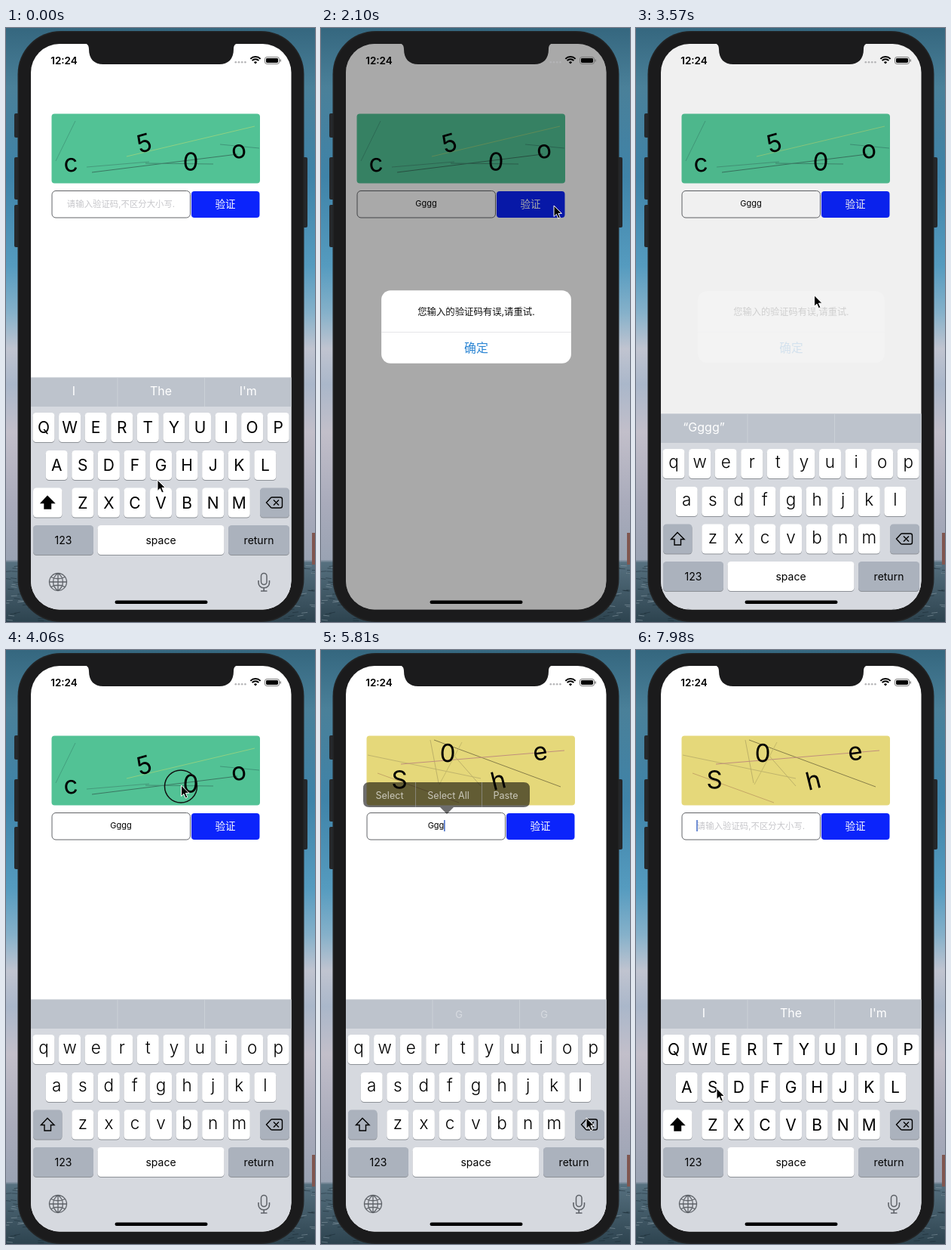
Animation, 410 px wide and 786 px high, one loop 8000 ms. Source, as an HTML page with a canvas:

```html
<!DOCTYPE html>
<html lang="zh">
<head>
<meta charset="utf-8">
<title>Captcha check</title>
<style>
html, body { margin: 0; width: 100%; height: 100%; overflow: hidden; }
canvas { display: block; width: 410px; height: 786px; }
</style>
</head>
<body>
<canvas id="stage" width="410" height="786"></canvas>
<script>
const ctx = document.getElementById('stage').getContext('2d');
const FONT = 'Inter, "Noto Sans CJK SC", "Noto Sans CJK", sans-serif';
const LOOP = 8000, STEP = 70;

const TYPED = [100, 260, 420, 580];
const DELETED = [5660, 6000, 6240, 6480];
const CLICKS = [...TYPED, 1600, 3150, 4000, 4850, ...DELETED];
const POINTER = [
  [0, 201, 598], [640, 201, 598], [910, 259, 442], [1330, 309, 235],
  [2240, 309, 235], [2900, 238, 415], [3430, 238, 415], [3850, 232.5, 179],
  [4200, 232.5, 179], [4700, 166, 232], [5000, 166, 232], [5450, 352, 619],
  [6750, 352, 619], [7600, 107, 580], [8000, 107, 580]
];

const GREEN = {
  fill: '#52c295',
  // text, center x, center y, degrees
  glyphs: [['c', 86, 181, -4], ['5', 183, 152, -16], ['0', 245, 176.5, 3], ['o', 309, 163, -8]],
  lines: [
    ['#44a07f', 66, 176, 92, 123], ['#469a7c', 107, 184, 190, 177],
    ['#3b7762', 114, 191, 307, 167], ['#8ed183', 160, 170, 330, 130],
    ['#3f8a70', 185, 179, 275, 180], ['#40967a', 284, 154, 336, 159]
  ]
};
const YELLOW = {
  fill: '#e5d87a',
  glyphs: [['S', 104, 170.5, 0], ['0', 168, 136, 2], ['h', 235, 172, -14], ['e', 291, 136.5, -8]],
  lines: [
    ['#c0b46c', 62, 139, 212, 170], ['#bdb168', 145, 119, 156, 176],
    ['#877e49', 150, 119, 318, 181], ['#c08f7c', 106, 151, 323, 133],
    ['#bdb168', 175, 138, 212, 180], ['#c5a766', 75, 163, 183, 202],
    ['#c6ba69', 157, 178, 187, 122]
  ]
};

const clamp = v => Math.max(0, Math.min(1, v));
const ramp = (t, start, length) => clamp((t - start) / length);
const smooth = p => p * p * (3 - 2 * p);
const easeOut = p => 1 - (1 - p) ** 3;
const random = n => { const v = Math.sin(n * 127.1 + 3.7) * 43758.5; return v - Math.floor(v); };

function box(x, y, w, h, r, fill, stroke, width = 1) {
  ctx.beginPath();
  ctx.roundRect(x, y, w, h, r);
  if (fill) { ctx.fillStyle = fill; ctx.fill(); }
  if (stroke) { ctx.strokeStyle = stroke; ctx.lineWidth = width; ctx.stroke(); }
}

function label(str, x, y, size, color, weight = 400) {
  ctx.font = `${weight} ${size}px ${FONT}`;
  ctx.textAlign = 'center';
  ctx.fillStyle = color;
  ctx.fillText(str, x, y + size * 0.36);
}

function line(color, x1, y1, x2, y2, width = 1) {
  ctx.strokeStyle = color;
  ctx.lineWidth = width;
  ctx.beginPath();
  ctx.moveTo(x1, y1);
  ctx.lineTo(x2, y2);
  ctx.stroke();
}

function shape(d, fill, stroke, width = 1.4) {
  const path = new Path2D(d);
  if (fill) { ctx.fillStyle = fill; ctx.fill(path); }
  if (stroke) { ctx.strokeStyle = stroke; ctx.lineWidth = width; ctx.stroke(path); }
}

function group(draw) {
  ctx.save();
  draw();
  ctx.restore();
}

function drawWallpaper() {
  const sky = ctx.createLinearGradient(0, 0, 0, 786);
  [[0, '#35677f'], [.1, '#4a8099'], [.25, '#3f83a8'], [.4, '#559bbf'], [.48, '#86b1ca'],
   [.54, '#c0c4d0'], [.6, '#aab7ca'], [.68, '#c2bfca'], [.8, '#a9abbb'], [.895, '#9aa3b3'],
   [.9, '#56707f'], [1, '#2d434f']].forEach(([p, c]) => sky.addColorStop(p, c));
  ctx.fillStyle = sky;
  ctx.fillRect(0, 0, 410, 786);
  ctx.fillStyle = '#80564f';
  ctx.fillRect(406, 668, 4, 42);
  // choppy water on both sides of the phone
  for (let i = 0; i < 90; i++) {
    const x = i % 2 ? random(i) * 50 : 410 - random(i) * 50;
    const y = 709 + random(i + 200) * 76;
    line(i % 3 ? 'rgba(20,36,46,.45)' : 'rgba(170,185,195,.4)', x - 4, y, x + 4, y + random(i + 400) * 3 - 1.5);
  }
}

function drawPhone() {
  [[11, 113, 32], [11, 171, 56], [11, 234, 56], [393, 171, 93]]
    .forEach(([x, y, h]) => box(x, y, 7, h, 2, '#25282b'));
  box(15.5, 4, 380, 782, 57, '#222324');
  box(17, 5.5, 377, 779, 56, '#1b1b1c');
}

function drawStatus() {
  shape('M102 20H310C304 20 302 23 302 28C302 41 295 48 283 48H129C117 48 110 41 110 28C110 23 108 20 102 20Z', '#1b1b1c');
  label('12:24', 77, 43, 13.5, '#000', 600);
  for (let i = 0; i < 4; i++) box(303.5 + i * 4.2, 44, 2.6, 2.6, 1.3, '#b4b4b6');
  [3, 6.2, 9.4].forEach((r, i) => {
    ctx.beginPath();
    ctx.arc(331, 47.5, r, Math.PI * 1.25, Math.PI * 1.75);
    if (!i) { ctx.lineTo(331, 47.5); ctx.fillStyle = '#000'; ctx.fill(); }
    else { ctx.strokeStyle = '#000'; ctx.lineWidth = 2; ctx.stroke(); }
  });
  box(343.5, 38.5, 19, 9, 2.6, null, '#777');
  box(345, 40, 16, 6, 1.4, '#000');
  box(363.5, 41.3, 1.4, 3.4, .7, '#777');
}

function drawCaptcha({ fill, glyphs, lines }) {
  box(60.5, 113.5, 276.5, 92, 4, fill);
  lines.forEach(l => line(...l));
  for (const [char, x, y, angle] of glyphs) group(() => {
    ctx.translate(x, y);
    ctx.rotate(angle * Math.PI / 180);
    ctx.font = `400 33px ${FONT}`;
    ctx.textAlign = 'center';
    ctx.fillStyle = '#000';
    ctx.fillText(char, 0, /[ceo]/.test(char) ? 9.2 : 12);
  });
}

function drawForm(t, value) {
  drawCaptcha(t < 4130 ? GREEN : YELLOW);
  box(61, 215.5, 183.5, 35.5, 5, '#fff', '#626468');
  box(246, 216, 90.5, 35, 4, '#0b24fb');
  label('验证', 291, 233.5, 13.5, '#fff');
  if (value) label(value, 152.5, 232.5, 11, '#000');
  else label('请输入验证码,不区分大小写.', 152.5, 232.5, 11.4, '#c6c6ca');

  const edits = [...TYPED, 3360, 4850, ...DELETED].filter(e => e <= t);
  const blinkOn = edits.length && (t - edits.at(-1)) % 1000 < 560;
  const editing = t < 1680 || t > 3640;
  if (blinkOn && editing) {
    const x = value ? 152.5 + ctx.measureText(value).width / 2 + .5 : 81;
    line('#3f67c4', x, 225, x, 240, 1.5);
  }
}

function drawMenu(t) {
  const alpha = ramp(t, 5000, 150) * (1 - ramp(t, 5760, 150));
  if (!alpha) return;
  group(() => {
    ctx.globalAlpha = alpha;
    shape('M64 175H269Q277 175 277 183V200Q277 208 269 208H176L167 217L158 208H64Q56 208 56 200V183Q56 175 64 175Z', 'rgba(0,0,0,.86)');
    [125.5, 213.5].forEach(x => line('#999', x, 175, x, 208));
    [['Select', 91], ['Select All', 169], ['Paste', 245]]
      .forEach(([s, x]) => label(s, x, 192, 12.6, '#fff'));
  });
}

function drawAlert(p, fade) {
  ctx.globalAlpha = p * fade;
  ctx.fillStyle = 'rgba(0,0,0,.365)';
  ctx.fillRect(33, 21, 346, 749);
  ctx.globalAlpha = Math.min(1, p * 1.1) * fade;
  const scale = 1.2 - .2 * p;
  ctx.translate(206, 395.5);
  ctx.scale(scale, scale);
  ctx.translate(-206, -395.5);
  box(82, 348, 248, 95, 12, '#fff');
  line('#e6e6e8', 82, 402.5, 330, 402.5);
  label('您输入的验证码有误,请重试.', 206, 376, 12.2, '#111');
  label('确定', 206, 423, 15.7, '#2b85d3');
}

function suggestions(t) {
  if (t < 130) return ['I', 'The', "I'm"];
  if (t < 1120) return ['“G”', 'Good', 'Great'];
  if (t < 3780) return ['“Gggg”', '', ''];
  if (t < 5900) return ['', '', ''];
  if (t < 6500) return [t < 6240 ? '“Gg”' : '“G”', '', ''];
  return ['I', 'The', "I'm"];
}

function drawKey(x, y, w, fill = '#fff') {
  box(x, y + 1, w, 39, 4.5, '#8d9197');
  box(x, y, w, 39, 4.5, fill);
}

function drawKeyboard(t, upper) {
  const GREY = '#abb2bd', ICON = '#5f6369';
  ctx.fillStyle = '#d6d9df';
  ctx.fillRect(33, 462.5, 346, 308);
  ctx.fillStyle = '#bdc3cc';
  ctx.fillRect(33, 462.5, 346, 38.5);
  [148, 263.5].forEach(x => line('#cbd0d7', x, 463, x, 501));
  suggestions(t).forEach((s, i) => label(s, 90 + i * 115.6, 480.5, 16, '#fff'));
  if (t >= 5740 && t < 5900)
    [183, 296].forEach(x => label('G', x, 482, 13, 'rgba(255,255,255,.4)'));

  ['qwertyuiop', 'asdfghjkl', 'zxcvbnm'].forEach((row, r) => {
    const first = [50, 67.2, 101.8][r], y = [509, 559, 608.5][r];
    [...row].forEach((char, i) => {
      const x = first + i * 34.58;
      drawKey(x - 14.5, y, 29);
      if (upper) label(char.toUpperCase(), x, y + 19.5, 21, '#000');
      else label(char, x, y + 17, 22.5, '#000', 300);
    });
  });

  drawKey(36, 608.5, 38.5, upper ? '#fff' : GREY);
  shape('M55 619.5L46.5 628.5H51V636H59.5V628.5H64Z', upper ? '#000' : null, '#000');
  drawKey(337, 608.5, 39, GREY);
  shape('M345.5 628L351.5 621.5Q352 621 353 621H364Q366.5 621 366.5 623.5V632.5Q366.5 635 364 635H353Q352 635 351.5 634.5ZM355 624.5L362 631.5M362 624.5L355 631.5', null, '#000');

  drawKey(36, 658, 80, GREY);
  drawKey(121.5, 658, 168);
  drawKey(295, 658, 81, GREY);
  [['123', 76], ['space', 205.5], ['return', 335.5]]
    .forEach(([s, x]) => label(s, x, 677.5, 14, '#000'));

  shape('M57.5 733a11.5 11.5 0 1 0 23 0a11.5 11.5 0 1 0 -23 0H80.5M69 721.5V744.5M69 721.5C60.5 727 60.5 739 69 744.5C77.5 739 77.5 727 69 721.5M60 726.5Q69 731 78 726.5M60 739.5Q69 735 78 739.5', null, ICON, 1.3);
  box(338.5, 721.5, 7.5, 15, 3.75, null, ICON, 1.5);
  shape('M335 731V734C335 743 349.5 743 349.5 734V731M342.2 741V745M338 745H346.5', null, ICON, 1.6);
}

function drawPointer(t) {
  const next = Math.max(1, POINTER.findIndex(k => k[0] > t));
  const [t0, x0, y0] = POINTER[next - 1], [t1, x1, y1] = POINTER[next];
  const p = smooth(ramp(t, t0, t1 - t0));
  ctx.translate(x0 + (x1 - x0) * p, y0 + (y1 - y0) * p);
  if (CLICKS.some(c => t >= c && t < c + 120)) {
    ctx.beginPath();
    ctx.arc(-.5, 1.5, 21.5, 0, 7);
    ctx.strokeStyle = '#111';
    ctx.lineWidth = 1.5;
    ctx.stroke();
  }
  shape('M0 0V14.5L3.4 11.4L5.8 17L8.3 15.9L5.9 10.4H10.4Z', '#000', '#fff', 1);
}

function draw(t) {
  const typed = TYPED.filter(c => c <= t).length - DELETED.filter(c => c <= t).length;
  const value = 'Gggg'.slice(0, typed);
  const shake = t > 1890 && t < 2450 ? -13 * Math.cos((t - 2100) / 280 * 2 * Math.PI) : 0;
  const alertIn = easeOut(ramp(t, 1870, 400));
  const alertFade = 1 - smooth(ramp(t, 3360, 280));
  const hidden = smooth(ramp(t, 1640, 300)) - smooth(ramp(t, 3270, 400));

  drawWallpaper();
  drawPhone();
  group(() => {
    box(33, 21, 345.5, 748.5, 38, '#fff');
    ctx.clip();
    group(() => { ctx.translate(shake, 0); drawForm(t, value); });
    drawMenu(t);
    if (alertIn * alertFade > 0) group(() => drawAlert(alertIn, alertFade));
    if (hidden < 1) group(() => {
      ctx.translate(0, hidden * 307);
      drawKeyboard(t, !value);
    });
    box(144.5, 757.5, 123, 4.5, 2.25, '#000');
  });
  drawStatus();
  group(() => drawPointer(t));
}

const start = performance.now();
function tick() {
  const t = (performance.now() - start) % LOOP;
  draw(Math.floor(t / STEP) * STEP);
  requestAnimationFrame(tick);
}
tick();
</script>
</body>
</html>
```
